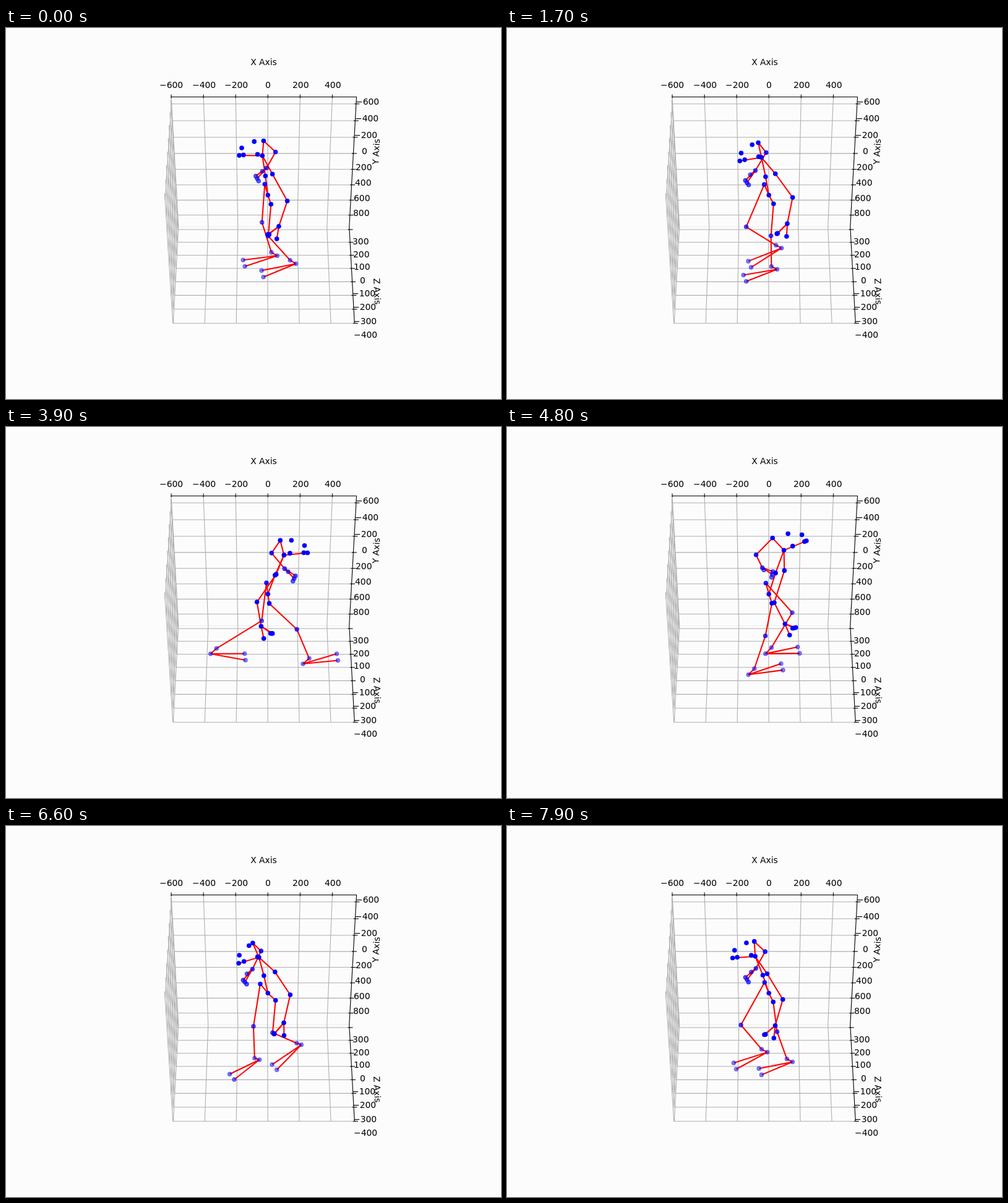
Animation of 800 by 600 pixels, one loop 8000 ms. Source, as an HTML page with a canvas:

```html
<!DOCTYPE html>
<html>
<head>
<meta charset="utf-8">
<style>
html, body { margin: 0; width: 100%; height: 100%; overflow: hidden; background: #fcfcfc; }
canvas { display: block; }
</style>
</head>
<body>
<canvas id="stage" width="800" height="600"></canvas>
<script>
const ctx = document.getElementById('stage').getContext('2d');
const LOOP = 8000, STEP = 100;
const { sin, cos, sqrt, round, min, max, PI } = Math;
const wave = turns => cos(2 * PI * turns);
const range = (from, to, step) =>
  Array.from({ length: (to - from) / step + 1 }, (_, i) => from + i * step);

// ---- perspective view of the data box; y points down, z away from the viewer ----
const X0 = -602, X1 = 550, Y0 = -681, Y1 = 959, Z0 = -400, Z1 = 322;

function project([x, y, z]) {
  const u = (x - X0) / (X1 - X0) - .5;
  const v = (y - Y0) / (Y1 - Y0);
  const w = (Z1 - z) / (Z1 - Z0);
  const depth = 1 + .085 * v - .0629 * w;
  return [416.5 + 300 * u / depth, (111.5 + 237.3 * v + 139.25 * w) / depth, depth];
}

function stroke(color, width, points) {
  ctx.strokeStyle = color;
  ctx.lineWidth = width;
  ctx.beginPath();
  points.forEach(p => ctx.lineTo(p[0], p[1]));
  ctx.stroke();
}

// ---- axes ----
const X_TICKS = range(-600, 400, 200);
const Y_TICKS = range(-600, 800, 200);
const Z_TICKS = range(-400, 300, 100);

function number(value, x, baseline) {
  const text = String(value).replace('-', '\u2212');
  ctx.fillText(text, round(x - ctx.measureText(text).width / 2), round(baseline));
}

function title(text, x, y, degrees = 0) {
  ctx.save();
  ctx.translate(x, y);
  ctx.rotate(degrees * PI / 180);
  ctx.fillText(text, -ctx.measureText(text).width / 2, 5);
  ctx.restore();
}

function drawAxes() {
  const line = (color, ...points) => stroke(color, 1.11, points.map(project));
  const grid = (...points) => line('#b0b0b0', ...points);
  const tick = (x, y, dx, dy) =>
    stroke('#000', 1.11, [[x - 2.5 * dx, y - 4 * dy], [x + 5.5 * dx, y + 2 * dy]]);

  line('#ededed', [X0, Y1, Z1], [X1, Y1, Z1]);
  X_TICKS.forEach(x => grid([x, Y0, Z1], [x, Y1, Z1], [x, Y1, Z0]));
  Y_TICKS.forEach(y => grid([X0, y, Z0], [X0, y, Z1], [X1, y, Z1]));
  Z_TICKS.forEach(z => grid([X0, Y0, z], [X0, Y1, z], [X1, Y1, z]));
  line('#000', [X0, Y0, Z1], [X1, Y0, Z1], [X1, Y1, Z1], [X1, Y1, Z0]);

  ctx.fillStyle = '#000';
  ctx.font = '13.89px "DejaVu Sans", sans-serif';
  X_TICKS.forEach(value => {
    const [x, y] = project([value, Y0, Z1]);
    tick(x, y, 0, 1);
    number(value, x + .5, y - 14.5);
  });
  Y_TICKS.forEach(value => {
    const [x, y] = project([X1, value, Z1]);
    tick(x, y, 1, 0);
    number(value, x + 18.5, y + 1.5);
  });
  Z_TICKS.forEach(value => {
    const [x, y] = project([X1, Y1, value]);
    tick(x, y, 1, 0);
    number(value, x + 18, y + 24);
  });
  title('X Axis', 416.5, 55);
  title('Y Axis', 598, 200, -87);
  title('Z Axis', 600, 426, 87);
}

// ---- walk: time, heading in degrees, gait cycles, stride size, forward lean ----
const KEYS = [
  [0, 12, .62, .25, 35],
  [1700, 24, 1.22, 1, 50],
  [2600, 26, 1.52, 1.05, 45],
  [3900, 174, 2.53, 1.05, 98],
  [4800, 196, 2.78, .95, 95],
  [6600, 32, 3.58, .55, 65],
  [7900, 18, 4.28, .95, 88]
];

function walkAt(t) {
  const last = KEYS.length - 1;
  const i = max(0, min(last - 1, KEYS.findIndex(k => k[0] > t) - 1));
  const a = KEYS[t >= KEYS[last][0] ? last - 1 : i], n = KEYS.indexOf(a);
  const b = KEYS[n + 1], before = KEYS[max(0, n - 1)], after = KEYS[min(last, n + 2)];
  const span = b[0] - a[0], f = (t - a[0]) / span;
  return a.slice(1).map((v, j) => {
    const c = j + 1;
    const m0 = (b[c] - before[c]) / (b[0] - before[0]) * span;
    const m1 = (after[c] - v) / (after[0] - a[0]) * span;
    return v + (b[c] - v) * f * f * (3 - 2 * f) + f * (1 - f) * ((1 - f) * m0 - f * m1);
  });
}

// Offsets are [forward, down, left], in the units of the axes.
const add = (p, f, d, s) => [p[0] + f, p[1] + d, p[2] + s];
const turn = degrees => {
  const a = degrees * PI / 180;
  return ([f, d, s]) => project([sin(a) * s - cos(a) * f, d, -sin(a) * f - cos(a) * s]);
};

function arm(neck, side, q, stride) {
  const swing = -25 * stride * wave(q);
  const shoulder = add(neck, -35, 30, 128 * side);
  const elbow = add(shoulder, swing - 85, 255, 60 * side);
  const wrist = add(elbow, swing + 55, 235, 35 * side);
  const hand = [0, 1, 2].map(i => add(wrist, 70 - 7 * i, 78 + 18 * i, -10 * i * side));
  return [shoulder, elbow, wrist, ...hand, add(wrist, 20, 90, 35 * side)];
}

function leg(side, q, stride) {
  const thigh = stride * (70 + 148 * wave(q - .9));
  const shin = 185 * stride * wave(q - .06) - 105;
  const drop = 20 - 70 * stride * wave(q - .1);
  const hip = [0, -12, 78 * side];
  const knee = add(hip, thigh, sqrt(440 ** 2 - thigh ** 2), -23 * side);
  const ankle = add(knee, shin, sqrt(420 ** 2 - shin ** 2), -5 * side);
  const heel = add(ankle, -40, 65, 0);
  return [hip, knee, ankle, heel, ...[25, -25].map(s => add(heel, 225, drop, s * side))];
}

function dot([x, y, depth]) {
  const alpha = max(.45, min(1, 1 - 12 * (depth - 1)));
  ctx.fillStyle = ctx.strokeStyle = `rgba(0,0,255,${alpha})`;
  ctx.lineWidth = 1.39;
  ctx.beginPath();
  ctx.arc(x, y, 3.1, 0, 7);
  ctx.fill();
  ctx.stroke();
}

function drawFigure(t) {
  const [heading, cycle, stride, lean] = walkAt(t);
  const chest = turn(heading);
  const hips = turn(heading - 12 * stride * wave(cycle));
  const dots = [];
  const bone = (...points) => stroke('#f00', 2.08, points);

  const neckAt = [lean, -490, 0];
  const pelvis = chest([0, 0, 0]), neck = chest(neckAt);
  const spine = chest([lean * .45, -240, 0]);
  const nose = chest(add(neckAt, 143, -50, 0));
  bone(pelvis, spine, neck, nose);
  dots.push(pelvis, spine, neck, nose);

  for (const side of [-1, 1]) {
    const q = side > 0 ? cycle : cycle + .5;
    const armDots = arm(neckAt, side, q, stride).map(chest);
    const legDots = leg(side, q, stride).map(hips);
    const [shoulder, elbow, wrist, h1, h2, , h4] = armDots;
    const [hip, knee, ankle, heel, t1, t2] = legDots;
    bone(neck, shoulder, elbow, wrist, h1);
    bone(h2, wrist, h4);
    bone(pelvis, hip, knee, ankle, heel);
    bone(t1, heel, t2);
    const eye = chest(add(neckAt, 122, -90, 27 * side));
    const ear = chest(add(neckAt, 40, -105, 49 * side));
    dots.push(...legDots, ...armDots, eye, ear);
  }
  dots.sort((a, b) => b[2] - a[2]).forEach(dot);
}

function frame() {
  const t = Math.floor(performance.now() % LOOP / STEP) * STEP;
  ctx.fillStyle = '#fcfcfc';
  ctx.fillRect(0, 0, 800, 600);
  ctx.lineJoin = 'round';
  drawAxes();
  drawFigure(t);
  requestAnimationFrame(frame);
}
frame();
</script>
</body>
</html>
```
